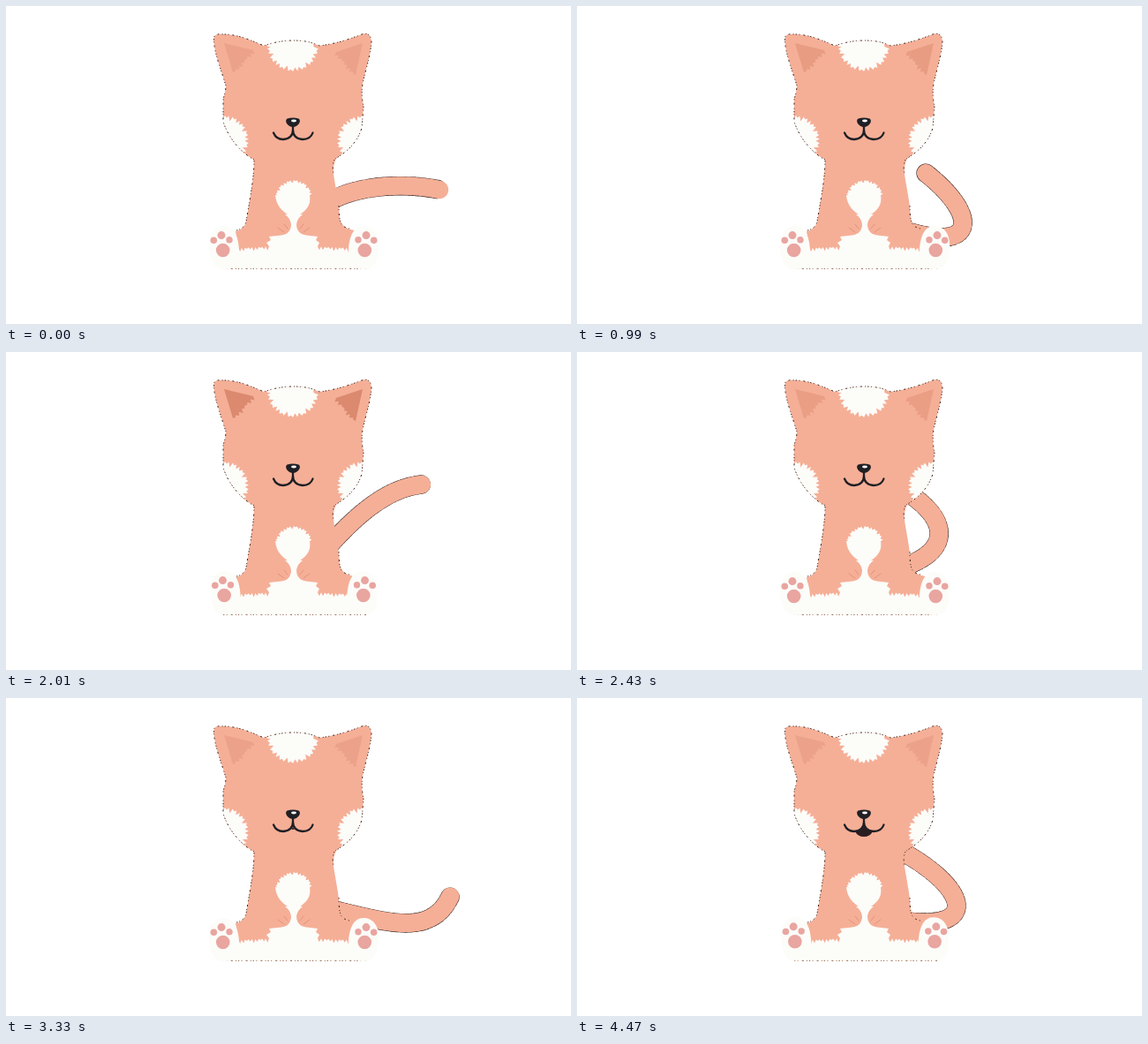
An HTML page that plays this animation: 640x360 px, repeating every 4500 ms.

```html
<!DOCTYPE html>
<html lang="en">
<head>
<meta charset="utf-8">
<title>Cat wagging its tail</title>
<style>
  html, body { margin: 0; width: 100%; height: 100%; overflow: hidden; background: #fff; }
  svg { display: block; width: 640px; height: 360px; }
  .coat { fill: #f5af97; }
  .white { fill: #fcfcf9; }
  .edge { fill: none; stroke: #35221d; stroke-width: 1; stroke-dasharray: 1.4 2.4 1 4 2 3.2 1 1.8; }
  .line { fill: none; stroke: #1f1f24; stroke-width: 2.3; stroke-linecap: round; stroke-linejoin: round; }
  .crease { fill: none; stroke: #e39379; stroke-width: 1; stroke-linecap: round; }
  .pad { fill: #e9a5a0; }
  .ear { fill: #d8856a; }
  .ink { fill: #1f1f24; }
  #tail, #tailEdge { fill: none; stroke-linecap: round; }
  #tail { stroke: #f5af97; stroke-width: 20.5; }
  #tailEdge { stroke: #35221d; stroke-width: 21.6; }
</style>
</head>
<body>
<svg viewBox="0 0 640 360">
  <defs>
    <path id="skull" d="M281 174C268 167 253 152 246 131L246 105Q249 97 249 90L240 62Q234 42 236 34Q239 31 246 32C262 32 276 38 292 45Q309 39 326 39Q343 39 355 45C372 43 388 38 403 32Q413 29 414 40C413 56 407 73 404 88Q402 100 405 114L403 138C398 155 386 165 373 173"/>
    <clipPath id="skullClip"><use href="#skull"/></clipPath>
    <g id="foot">
      <path class="white" d="M230 273C229 260 235 249 247 249C259 249 263 262 264 275C265 291 258 298 247 298C236 298 231 288 230 273Z"/>
      <circle class="pad" cx="245.7" cy="276.5" r="7.8"/>
      <circle class="pad" cx="235.3" cy="265.3" r="3.8"/>
      <circle class="pad" cx="244" cy="259.6" r="4.5"/>
      <circle class="pad" cx="253" cy="264.8" r="3.7"/>
    </g>
  </defs>

  <g>
    <path id="tailEdge"/>
    <path id="tail"/>
  </g>

  <rect class="white" x="234" y="256" width="186" height="42" rx="14"/>
  <path class="coat" id="torso"/>
  <path class="edge" d="M281 175C281 197 275 225 272 244Q270 252 261 254M372 174Q369 180 371 190M377 226Q377 243 380 247Q383 251 389 252"/>
  <path class="white" id="chest"/>
  <g id="creases">
    <path class="crease" d="M308 251L315 256M315 247L319 252"/>
    <path class="crease" d="M344 251L337 256M337 247L333 252"/>
  </g>
  <path class="edge" d="M246 297.4H409" style="stroke:#9a6a50"/>

  <g id="footL"><use href="#foot"/></g>
  <g id="footR"><use href="#foot" transform="translate(652) scale(-1 1)"/></g>

  <g id="head">
    <use href="#skull" class="coat"/>
    <path class="ear" id="earL"/>
    <path class="ear" id="earR"/>
    <g clip-path="url(#skullClip)">
      <path class="white" id="brow"/>
      <path class="white" id="cheekL"/>
      <path class="white" id="cheekR"/>
    </g>
    <use href="#skull" class="edge"/>
    <path id="mouth" fill="#2a1d1f" d="M325 145Q322 151 315 151Q318 157 325 157Q332 157 335 151Q328 151 325 145Z"/>
    <path class="line" d="M303 143.5Q306 151 314 151Q325 150 325 140V136V140Q325 150 336 151Q345 151 347.5 143.5"/>
    <path class="ink" d="M318.5 127.5Q325 125.5 331.5 127.5Q334 129 332 133Q329 137 325 137Q321 137 318 133Q316 129 318.5 127.5Z"/>
    <ellipse cx="326" cy="130" rx="3" ry="1.4" fill="#fff"/>
  </g>
</svg>

<script>
const LOOP = 4500, WAG = 1800, STEP = 30;
const $ = id => document.getElementById(id);
const pt = (x, y) => `L${x.toFixed(1)} ${y.toFixed(1)}`;

// Zigzag fur along a straight edge
function fur(x0, y0, x1, y1, teeth, amp) {
  const dx = x1 - x0, dy = y1 - y0, len = Math.hypot(dx, dy);
  let d = '';
  for (let i = 0; i <= teeth * 2; i++) {
    const k = i / (teeth * 2);
    const a = i % 2 ? amp * (0.75 + 0.4 * Math.sin(i * 2.3)) : 0;
    d += pt(x0 + dx * k - dy / len * a, y0 + dy * k + dx / len * a);
  }
  return d;
}

// Zigzag fur along an elliptic arc, angles in degrees
function furArc(cx, cy, rx, ry, from, to, teeth, amp) {
  let d = '';
  for (let i = 0; i <= teeth * 2; i++) {
    const a = (from + (to - from) * i / (teeth * 2)) * Math.PI / 180;
    const cut = i % 2 ? 0 : amp * (0.75 + 0.4 * Math.sin(i * 1.9));
    d += pt(cx + (rx - cut) * Math.cos(a), cy + (ry - cut) * Math.sin(a));
  }
  return d;
}

const set = (id, d) => $(id).setAttribute('d', d);
set('torso', 'M281 160V174C281 195 275 225 272 244Q270 253 260 255L263 274' +
  fur(263, 274, 298, 272, 9, 4) +
  'L295 268L300 265L298 261Q305 260 312 259.5Q323 258 323 247Q322 240 316 236H336Q330 240 329 247Q329 258 340 259.5' +
  'Q347 260 353 261L351 265L355 268L353 272' +
  fur(353, 272, 390, 274, 9, 4) +
  'L395 254Q380 252 378 240C377 220 373 205 371 190Q370 178 376 170V160Z');
set('chest', 'M306 214' + furArc(326, 217, 21, 20, 188, 352, 15, 3) +
  'C346 226 339 232 333 236C327 241 327 250 331 257H320C325 250 325 241 319 236C313 232 306 226 305 214Z');
set('brow', 'M296 30V46' + furArc(325, 46, 29, 28, 180, 0, 17, 5) + 'V30Z');
set('cheekL', 'M240 152' + furArc(248, 152, 27, 28, -95, 60, 16, 5) + 'L240 175Z');
set('cheekR', 'M412 152' + furArc(403, 152, 28, 28, 275, 120, 16, 5) + 'L412 175Z');
set('earL', 'M247 42L280 50' + fur(280, 50, 257, 75, 7, -4) + 'Z');
set('earR', 'M404 42L374 52' + fur(374, 52, 396, 78, 7, 4) + 'Z');

// Phase of the wag, then the four Bezier points of the tail
const TAIL = [
  [0, 360, 226, 385, 206, 440, 198, 491, 208],
  [210, 360, 226, 388, 194, 427, 154, 471, 150],
  [390, 362, 231, 405, 198, 432, 165, 438, 143],
  [540, 365, 240, 415, 212, 416, 180, 385, 154],
  [870, 375, 253, 455, 262, 442, 216, 372, 176],
  [1020, 375, 255, 454, 280, 455, 238, 402, 192],
  [1470, 365, 240, 430, 255, 480, 275, 493, 223],
  [1680, 363, 234, 410, 238, 470, 250, 517, 222]
];

// Smooth closed curve through the tail poses
function tailAt(phase) {
  const n = TAIL.length;
  const at = i => {
    const p = TAIL[(i + n) % n];
    return { t: p[0] + WAG * Math.floor(i / n), v: p.slice(1) };
  };
  let i = n - 1;
  while (TAIL[i][0] > phase) i--;
  const [a, b, c, d] = [at(i - 1), at(i), at(i + 1), at(i + 2)];
  const h = c.t - b.t, k = (phase - b.t) / h, k2 = k * k, k3 = k2 * k;
  return b.v.map((vb, j) => {
    const vc = c.v[j];
    const mb = (vc - a.v[j]) / (c.t - a.t) * h;
    const mc = (d.v[j] - vb) / (d.t - b.t) * h;
    return (2 * k3 - 3 * k2 + 1) * vb + (k3 - 2 * k2 + k) * mb +
      (3 * k2 - 2 * k3) * vc + (k3 - k2) * mc;
  });
}

// Eased value from [time, value] pairs
function key(t, keys) {
  let i = 0;
  while (i < keys.length - 2 && keys[i + 1][0] <= t) i++;
  const [t0, v0] = keys[i], [t1, v1] = keys[i + 1];
  const k = Math.min(1, Math.max(0, (t - t0) / (t1 - t0)));
  return v0 + (v1 - v0) * k * k * (3 - 2 * k);
}

const TILT = [[0, 0], [1170, 0], [1410, 2], [1560, 2], [1800, 0], [LOOP, 0]];
const MOUTH = [[0, 0], [1380, 0], [1560, 1], [1740, 1], [1900, 0], [3270, 0], [3480, 1], [LOOP, 1]];
const EARS = [[0, .3], [540, .4], [1470, .52], [2010, .88], [2600, .3], [LOOP, .3]];
const FEET = [[0, 0], [570, 0], [760, 1], [840, 1], [940, 0], [1200, 0]];

const edgeDash = '1 2.6 1 4 1 3 1 1.8';
$('tailEdge').setAttribute('stroke-dasharray', edgeDash);

function draw(t) {
  const [x0, y0, ...rest] = tailAt(t % WAG).map(v => v.toFixed(2));
  const d = `M${x0} ${y0}C${rest.join(' ')}`;
  set('tail', d);
  set('tailEdge', d);

  $('head').setAttribute('transform', `rotate(${key(t, TILT)} 325 160)`);
  const open = key(t, MOUTH);
  $('mouth').setAttribute('transform', `translate(325 147) scale(${open}) translate(-325 -147)`);
  for (const id of ['earL', 'earR']) $(id).setAttribute('opacity', key(t, EARS));

  const f = key(t % 1200, FEET);
  $('footL').setAttribute('transform', `translate(${1.5 * f} ${-f})`);
  $('footR').setAttribute('transform', `translate(${-1.5 * f} ${-f})`);
}

function tick(now) {
  draw(Math.floor(now % LOOP / STEP) * STEP);
  requestAnimationFrame(tick);
}
draw(0);
requestAnimationFrame(tick);
</script>
</body>
</html>
```
